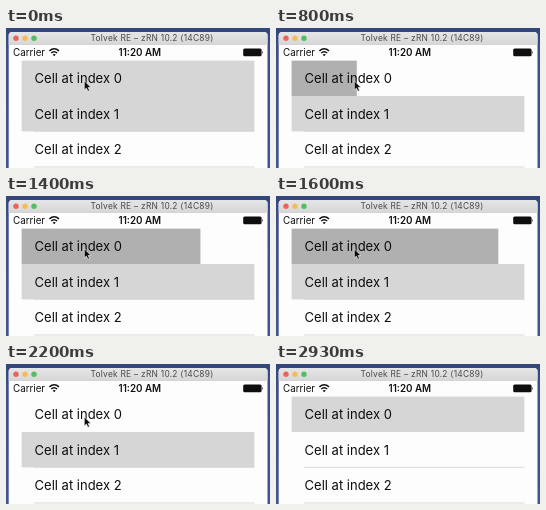
An HTML page that plays this animation: 264x140 px, repeating every 3.07 s.

```html
<!DOCTYPE html>
<html lang="en">
<head>
<meta charset="utf-8">
<title>Cell progress</title>
<style>
  html, body { margin: 0; width: 100%; height: 100%; overflow: hidden; background: #3c4f86; }
  svg { display: block; width: 264px; height: 140px; }
  text { font-family: Inter, Roboto, "Liberation Sans", sans-serif; }
  .title { font-size: 8.4px; letter-spacing: 0.25px; fill: #48484a; text-anchor: middle; }
  .status { font-size: 9.8px; fill: #111; }
  .clock { font-weight: 600; text-anchor: middle; }
  .label { font-size: 13px; fill: #0c0c0c; }
  .picked { fill: #d6d6d6; }
  .line { fill: #cfcfd1; }
</style>
</head>
<body>
<svg viewBox="0 0 264 140" width="264" height="140">
  <defs>
    <linearGradient id="sky" x1="0" y1="0" x2="0" y2="1">
      <stop offset="0" stop-color="#33457a"/>
      <stop offset="0.15" stop-color="#3c4f88"/>
      <stop offset="1" stop-color="#40548f"/>
    </linearGradient>
    <linearGradient id="bar" x1="0" y1="0" x2="0" y2="1">
      <stop offset="0" stop-color="#e6e6e6"/>
      <stop offset="1" stop-color="#d6d6d6"/>
    </linearGradient>
  </defs>

  <rect width="264" height="140" fill="url(#sky)"/>

  <!-- window -->
  <path d="M2.700 140V7.500Q2.700 4 6.200 4H258Q261.500 4 261.500 7.500V140Z" fill="#fdfdfd"/>
  <path d="M2.700 16.500V7.500Q2.700 4 6.200 4H258Q261.500 4 261.500 7.500V16.500Z" fill="url(#bar)"/>
  <rect x="2.700" y="16" width="258.800" height="0.600" fill="#c6c6c6"/>
  <circle cx="10" cy="10.300" r="2.700" fill="#ee625d"/>
  <circle cx="19" cy="10.300" r="2.700" fill="#f3bd52"/>
  <circle cx="28" cy="10.300" r="2.700" fill="#51c05c"/>
  <text class="title" x="146" y="13.200">Tolvek RE – zRN 10.2 (14C89)</text>

  <!-- status bar -->
  <text class="status" x="7" y="28">Carrier</text>
  <g fill="none" stroke="#111" stroke-width="1.500">
    <path d="M43.400 22.900Q48.200 18.700 53 22.900"/>
    <path d="M45.200 25Q48.200 22.400 51.200 25"/>
  </g>
  <path d="M46.600 26.600Q48.200 25.300 49.800 26.600L48.200 28.300Z" fill="#111"/>
  <text class="status clock" x="133.800" y="28">11:20 AM</text>
  <rect x="237.200" y="20.500" width="18.400" height="7.800" rx="1.500" fill="#0e0e0e"/>
  <path d="M256.200 23Q257.800 24.400 256.200 25.800Z" fill="#111"/>

  <!-- table -->
  <rect class="line" x="28" y="102.800" width="220.500" height="0.800"/>
  <rect class="line" x="28" y="138.600" width="220.500" height="0.800"/>
  <rect id="first" class="picked" x="15.600" y="32.600" width="232.800" height="35.400"/>
  <rect id="second" class="picked" x="15.600" y="68" width="232.800" height="35.400"/>
  <rect id="fill" x="15.600" y="32.600" width="0" height="35.400" fill="#b0b0b0"/>
  <text class="label" x="28.600" y="55">Cell at index 0</text>
  <text class="label" x="28.600" y="90.600">Cell at index 1</text>
  <text class="label" x="28.600" y="126.200">Cell at index 2</text>

  <path id="cursor" d="M78.300 52.800V62L80.400 60.100L81.900 63.300L83.500 62.600L82.100 59.500H84.900Z"
        fill="#0a0a0a" stroke="#fff" stroke-width="0.600" stroke-linejoin="round"/>
</svg>
<script>
  const LOOP = 3070, STEP = 1000 / 15, WIDTH = 232.8;
  const [first, second, fill, cursor] =
    ['first', 'second', 'fill', 'cursor'].map(id => document.getElementById(id));

  const show = (el, on) => el.setAttribute('visibility', on ? 'visible' : 'hidden');

  // cubic-bezier(.42, 0, .58, 1)
  function easeInOut(x) {
    let lo = 0, hi = 1;
    for (let i = 0; i < 24; i++) {
      const s = (lo + hi) / 2;
      if (s * (1.26 - s * (0.78 - 0.52 * s)) < x) lo = s; else hi = s;
    }
    return lo * lo * (3 - 2 * lo);
  }

  function draw(time) {
    // the screen refreshes 15 times a second; the fill takes 30 ticks
    const tick = Math.floor((time % LOOP + 4) / STEP);
    const done = Math.min(1, Math.max(0, (tick - 1) / 30));

    show(first, tick < 1 || tick >= 37);
    show(second, tick < 37);
    show(fill, tick >= 1 && tick < 33);
    show(cursor, tick < 43);
    fill.setAttribute('width', (WIDTH * easeInOut(done)).toFixed(2));
  }

  const start = performance.now();
  function loop() {
    draw(performance.now() - start);
    requestAnimationFrame(loop);
  }
  draw(0);
  requestAnimationFrame(loop);
</script>
</body>
</html>
```
